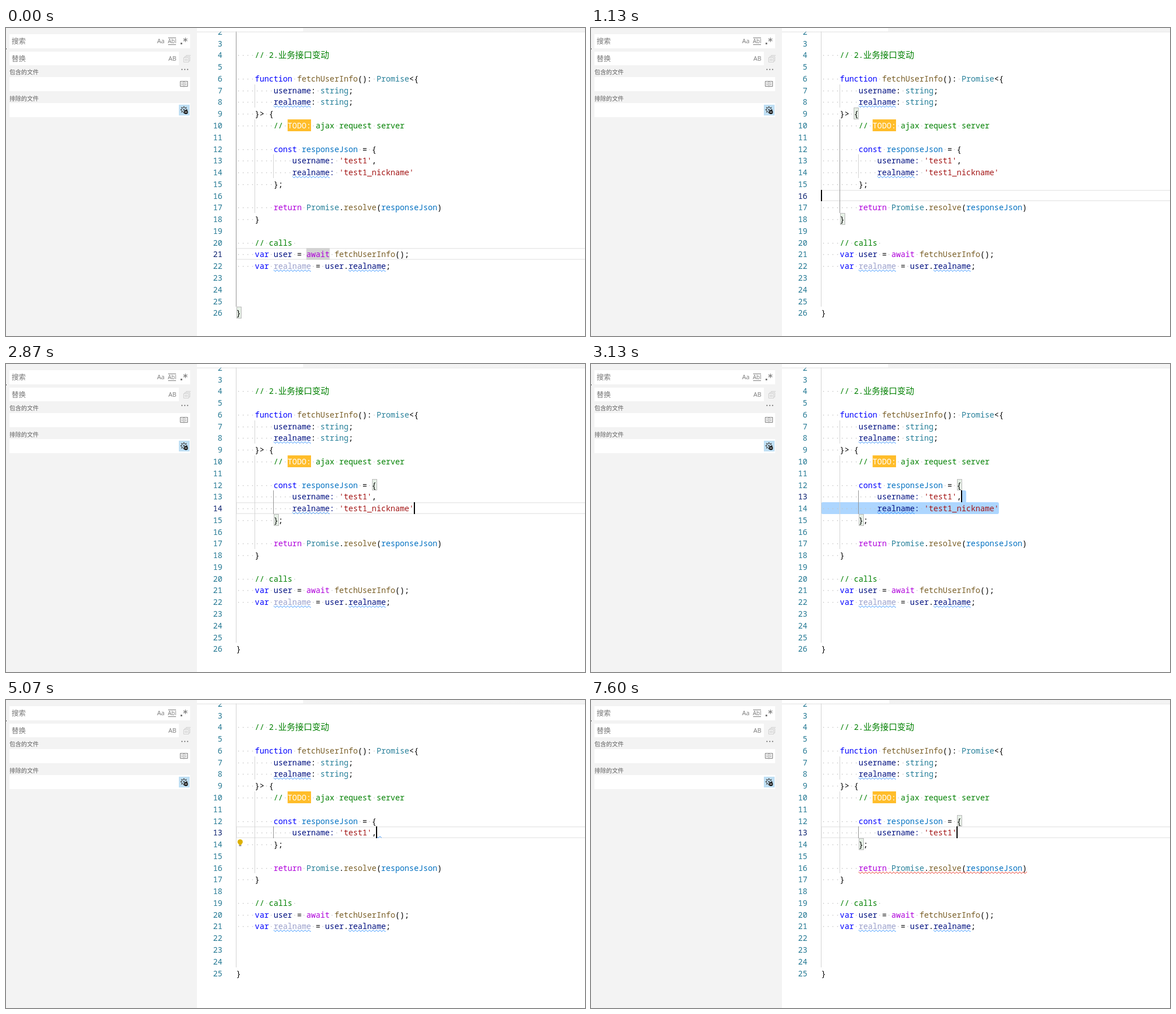
Animation, 1025 px wide and 546 px high, one loop 8 s. Source, as an HTML page with a canvas:

```html
<!DOCTYPE html>
<html lang="zh">
<meta charset="utf-8">
<style>
  html, body { margin: 0; height: 100%; overflow: hidden; background: #fff }
  canvas { display: block }
</style>
<canvas width="1025" height="546"></canvas>
<script>
const g = document.querySelector('canvas').getContext('2d');
const LOOP = 8000, CHAR = 8.28, LINE = 20.77, LEFT = 407.5, BASELINE = 16;
const MONO = '13.8px "Noto Sans Mono", monospace';
const CJK = '"Noto Sans CJK SC", "Noto Sans CJK", sans-serif';
const colX = c => LEFT + c * CHAR;
const rowY = n => Math.floor(17.1 + (n - 3) * LINE);
const rowH = n => rowY(n + 1) - rowY(n);

// Each token starts with "~" and a colour key; capital keys are underlined.
const COLORS = { k: '#0000ff', f: '#795e26', t: '#267f99', v: '#001080', N: '#001080', U: '#9a9fcb',
  c: '#0070c1', s: '#a31515', r: '#af00db', g: '#008000', p: '#000000', w: '#ffffff' };
const CODE = [
  '', '',
  '~g    // 2.业务接口变动',
  '',
  '~k    function ~ffetchUserInfo~p(): ~tPromise~p<{',
  '~v        username~p: ~tstring~p;',
  '~p        ~Nrealname~p: ~tstring~p;',
  '~p    }> {',
  '~g        // ~wTODO:~g ajax request server',
  '',
  '~k        const ~cresponseJson~p = {',
  "~v            username: ~s'test1'~p,",
  "~v            ~Nrealname~v: ~s'test1_nickname'",
  '~p        };',
  '',
  '~r        return ~tPromise~p.~fresolve~p(~cresponseJson~p)',
  '~p    }',
  '',
  '~g    // calls ',
  '~k    var ~vuser~p = ~rawait ~ffetchUserInfo~p();',
  '~k    var ~Urealname~p = ~vuser~p.~Nrealname~p;',
  '', '', '',
  '~p}'
];
const BLINKS = [130, 670, 1130, 1670, 2130, 2670, 2800, 3600, 4130, 4600, 5070, 6130, 6600, 7130, 7600];

function rect(x, y, w, h, color) { g.fillStyle = color; g.fillRect(x, y, w, h); }

function text(s, x, y, font, color, align = 'left') {
  g.font = font; g.fillStyle = color; g.textAlign = align;
  g.fillText(s, x, y);
}

function stroke(d, color, width = 1) {
  g.strokeStyle = color; g.lineWidth = width;
  g.stroke(new Path2D(d));
}

function circle(x, y, r, color) {
  g.fillStyle = color;
  g.beginPath(); g.arc(x, y, r, 0, 7); g.fill();
}

function round(x, y, w, h, radii, color) {
  g.fillStyle = color;
  g.beginPath(); g.roundRect(x, y, w, h, radii); g.fill();
}

function squiggle(row, col, count, color) {
  const x0 = colX(col), y = rowY(row) + 19.2;
  g.beginPath();
  for (let x = 0; x <= count * CHAR; x += 0.5)
    g.lineTo(x0 + x, y - 1.2 * Math.cos(x * Math.PI / 3.1));
  g.strokeStyle = color; g.lineWidth = 1; g.stroke();
}

function bracket(row, col) {
  const x = Math.round(colX(col)) + .5, y = rowY(row) + .5;
  rect(x, y, 8, rowH(row) - 1, '#e6f0e6');
  g.strokeStyle = '#b9b9b9'; g.lineWidth = 1;
  g.strokeRect(x, y, 8, rowH(row) - 1);
}

function guide(col, first, last, active) {
  const y = Math.max(6, rowY(first));
  rect(Math.round(colX(col) - .5), y, 1, rowY(last + 1) - y, active ? '#939393' : '#d3d3d3');
}

function codeLine(line, row, showUsed) {
  let col = 0;
  for (const token of line.split('~').slice(1)) {
    const key = token[0], chars = [...token.slice(1)];
    if (key === 'w') rect(colX(col), rowY(row), chars.length * CHAR, rowH(row), '#ffbd2a');
    if ('NU'.includes(key)) squiggle(row, col, chars.length, '#1a85ff');
    const color = key === 'U' && showUsed ? COLORS.v : COLORS[key];
    let x = colX(col);
    for (const ch of chars) {
      const wide = ch > '\u2fff';
      if (ch === ' ') circle(x + CHAR / 2, rowY(row) + 11.5, .85, '#c4c4c4');
      else text(ch, x, rowY(row) + BASELINE, wide ? '15px ' + CJK : MONO, color);
      x += wide ? 15 : CHAR;
    }
    col += chars.length;
  }
}

function bulb() {
  rect(408, 246, 14, 16, '#fff');
  circle(414.5, 251.5, 4.6, '#ddb100');
  rect(412.3, 254, 4.4, 3, '#ddb100');
  rect(412.5, 257.5, 4, 1.5, '#6b6b6b');
}

function sidebar() {
  rect(0, 0, 338, 546, '#f3f3f3');
  rect(0, 36, 1, 2, '#555');
  for (const [y, w, h] of [[11, 320, 25], [42, 300, 24], [87, 320, 25], [133, 320, 25]])
    rect(6, y, w, h, '#fff');
  text('搜索', 10, 28.3, '12.5px ' + CJK, '#767676');
  text('替换', 10, 58.8, '12.5px ' + CJK, '#767676');
  text('包含的文件', 6, 82, '10.4px ' + CJK, '#616161');
  text('排除的文件', 6, 128.7, '10.4px ' + CJK, '#616161');

  const small = '11px "Open Sans", sans-serif', gray = '#7a7a7a';
  text('Aa', 267.5, 27, small, gray);
  text('Abl', 294, 27, '10px "Open Sans", sans-serif', gray, 'center');
  stroke('M287 17.5H301M287 29.5H301', gray);
  text('AB', 287.5, 58, small, gray);
  rect(309, 26, 3, 3, gray);
  stroke('M317.5 17V25M314 19L321 23M321 19L314 23', gray, 1.1);
  stroke('M314.5 52.5H323.5V60.5H314.5ZM316.5 52V50.5H325.5V58.5H324M319 50V48.5H327M316 55.5H322M316 57.5H322', '#d0d0d0');
  for (const x of [311.5, 316.5, 321.5]) circle(x, 73.5, 1, '#555');
  stroke('M308.5 94.5H321.5V103.5H316L315 104.5L314 103.5H308.5ZM315 94.5V104M310.5 97.5H313M310.5 100.5H313M317 97.5H319.5M317 100.5H319.5', gray);

  rect(306, 136, 19, 19, '#bfdff4');
  for (let i = 0; i < 8; i++) {
    const a = i * Math.PI / 4, c = Math.cos(a), s = Math.sin(a);
    stroke(`M${315 + 4 * c} ${145 + 4 * s}L${315 + 6.3 * c} ${145 + 6.3 * s}`, '#444', 1.5);
  }
  g.beginPath(); g.arc(315, 145, 4.2, 0, 7); g.strokeStyle = '#444'; g.lineWidth = 1; g.stroke();
  circle(315, 145, 1.4, '#444');
  circle(318.5, 149, 3.6, '#111');
  rect(316.3, 148.4, 4.4, 1.2, '#fff');
}

function editor(t) {
  const removed = t >= 5070;
  const lines = removed ? CODE.filter((_, i) => i !== 12) : CODE.slice();
  if (t >= 5600) lines[11] = lines[11].replace('~p,', '');
  const shift = removed ? 1 : 0;
  const selecting = t >= 3130 && t < 5070;
  const [row, col] = t < 270 ? [21, 17] : t < 2800 ? [16, 0] : t < 3130 ? [14, 38] : [13, t < 5600 ? 30 : 29];

  g.save();
  g.beginPath(); g.rect(338, 6, 687, 540); g.clip();

  if (!selecting) {
    g.strokeStyle = '#eaeaea'; g.lineWidth = 1.6;
    g.strokeRect(408, rowY(row) + .8, 630, rowH(row) - 1.6);
  } else {
    round(colX(30), rowY(13), CHAR, rowH(13), [0, 3, 0, 0], '#add6ff');
    round(LEFT, rowY(14), 38 * CHAR, rowH(14), 3, '#add6ff');
  }
  if (t < 270) rect(colX(15), rowY(21), 5 * CHAR, rowH(21), '#d3d3d3');

  guide(0, 2, 25 - shift, t < 270);
  guide(4, 7, 8, false);
  guide(4, 10, 17 - shift, t >= 270 && t < 2800);
  guide(8, 13, 14 - shift, t >= 2800);

  const brackets = t < 270 ? [[26, 0]] : t < 2870 ? [[9, 7], [18, 4]]
    : t < 3200 ? [[12, 29], [15, 8]] : t >= 5130 ? [[12, 29], [14, 8]] : [];
  for (const place of brackets) bracket(...place);

  lines.forEach((line, i) => {
    const n = i + 2;
    text(n, 383, rowY(n) + BASELINE, MONO, n === row ? '#0b216f' : '#237893', 'right');
    codeLine(line, n, t >= 5270 && t < 5470);
  });

  if (removed && t < 5270) squiggle(13, 30, 1.1, '#1a85ff');
  if (t >= 5470) squiggle(16, 8, 36, '#e51400');
  if (t >= 3530 && t < 6000) bulb();
  if (BLINKS.filter(b => b <= t).length % 2)
    rect(Math.round(colX(col) - .5), rowY(row), 2, rowH(row), '#000');

  const shade = g.createLinearGradient(0, 6, 0, 9);
  shade.addColorStop(0, '#ddda');
  shade.addColorStop(1, '#ddd0');
  rect(338, 6, 687, 3, shade);
  g.restore();

  const tabEnd = t < 5130 ? 526 : 528;
  rect(tabEnd, 0, 1025 - tabEnd, 6, '#f3f3f3');
}

function draw() {
  rect(0, 0, 1025, 546, '#fff');
  sidebar();
  editor(performance.now() % LOOP);
  requestAnimationFrame(draw);
}
draw();
</script>
</html>
```
